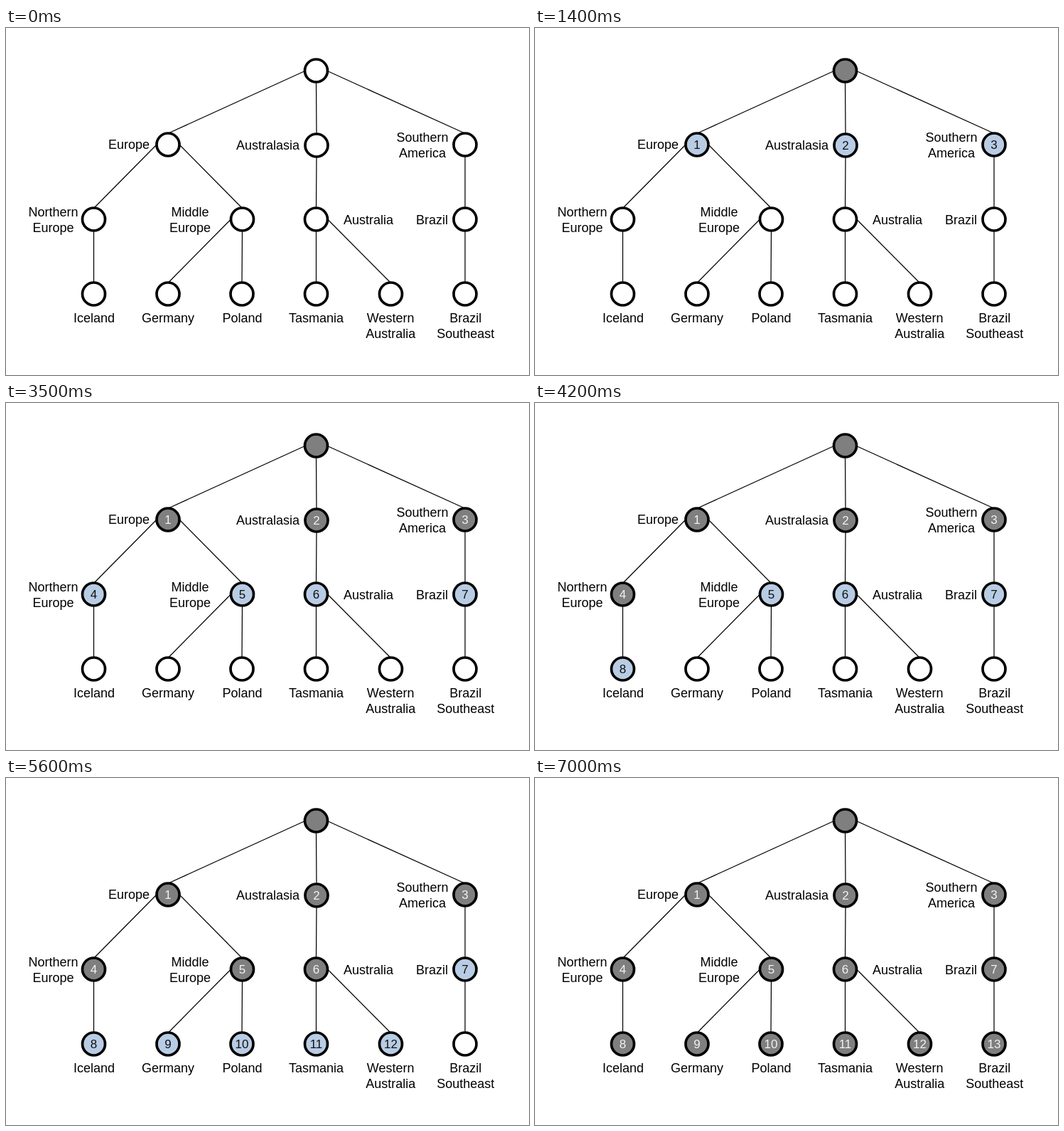
Write an HTML page that moves like this. It is 736 by 488 pixels and loops after 7.7 s.

```html
<!DOCTYPE html>
<html lang="en">
<head>
<meta charset="utf-8">
<title>Breadth-first search</title>
<style>
  html, body { margin: 0; width: 100%; height: 100%; overflow: hidden; background: #fff; }
  svg { display: block; }
  text { font: 18px "Liberation Sans", Arial, sans-serif; text-anchor: middle; }
  line { stroke: #000; stroke-width: 1.25; }
  circle { stroke: #000; stroke-width: 3.7; }
  .num { font-size: 17px; }
</style>
</head>
<body>
<svg id="stage" width="736" height="488" viewBox="0 0 736 488"></svg>
<script>
const STEP = 700, STEPS = 11;
const WHITE = '#fff', DIM = '#4f4f4f', DIM_ROOT = '#404040', OPEN = '#b8cce4', DONE = '#7f7f7f';
const stage = document.getElementById('stage');

function add(tag, attrs, text = '') {
  const el = document.createElementNS('http://www.w3.org/2000/svg', tag);
  for (const key in attrs) el.setAttribute(key, attrs[key]);
  el.textContent = text;
  return stage.appendChild(el);
}

// x, y, step when queued, step when visited; the index is the visiting order
const nodes = [
  [436.5, 60, 99, 2],
  [228, 164, 2, 3], [437, 165, 2, 4], [646, 164, 2, 5],
  [123.5, 269, 3, 6], [332.5, 269, 3, 7], [436.5, 269, 4, 8], [646, 269, 5, 9],
  [123.5, 374, 6, 10], [228, 374, 7, 10], [332, 374, 7, 10],
  [436.5, 374, 8, 10], [541.5, 374, 8, 10], [646, 374, 9, 10]
];
const edges = [[0, 1], [0, 2], [0, 3], [1, 4], [1, 5], [2, 6], [3, 7],
  [4, 8], [5, 9], [5, 10], [6, 11], [6, 12], [7, 13]];
// text, centre, first baseline
const labels = [
  ['Europe', 173, 170], ['Australasia', 368.5, 171], ['Southern|America', 586, 160],
  ['Northern|Europe', 66.5, 265], ['Middle|Europe', 259, 265],
  ['Australia', 510, 276], ['Brazil', 599.5, 276],
  ['Iceland', 124, 414], ['Germany', 228, 414], ['Poland', 332.5, 414],
  ['Tasmania', 436.5, 414], ['Western|Australia', 541.2, 414], ['Brazil|Southeast', 646.7, 414]
];

const back = add('rect', { width: 736, height: 488 });

for (const [from, to] of edges) {
  const [x, y] = nodes[from], [x2, y2] = nodes[to];
  const side = Math.abs(x2 - x) < 5 ? 0 : Math.sign(x2 - x);
  add('line', {
    x1: x + side * 17, y1: side ? y + 1 : y + 16,
    x2: x2 - side * 0.5, y2: y2 - 16
  });
}

for (const [text, x, y] of labels)
  text.split('|').forEach((row, i) => add('text', { x, y: y + i * 22 }, row));

const parts = nodes.map(([x, y], i) => ({
  disc: add('circle', { cx: x, cy: y, r: 16 }),
  num: add('text', { x, y: y + 6.3, class: 'num' }, i || '')
}));

function draw(step) {
  const dim = step === 1, blank = dim ? DIM : WHITE;
  back.setAttribute('fill', blank);
  parts.forEach(({ disc, num }, i) => {
    const [, , queued, visited] = nodes[i];
    const done = step >= visited, open = step >= queued;
    disc.setAttribute('fill', done ? DONE : open ? OPEN : dim && !i ? DIM_ROOT : blank);
    num.setAttribute('fill', done ? '#f2f2f2' : '#111');
    num.setAttribute('visibility', open ? 'visible' : 'hidden');
  });
}

const start = performance.now();
function tick() {
  draw(Math.floor((performance.now() - start) / STEP) % STEPS);
  requestAnimationFrame(tick);
}
tick();
</script>
</body>
</html>
```
